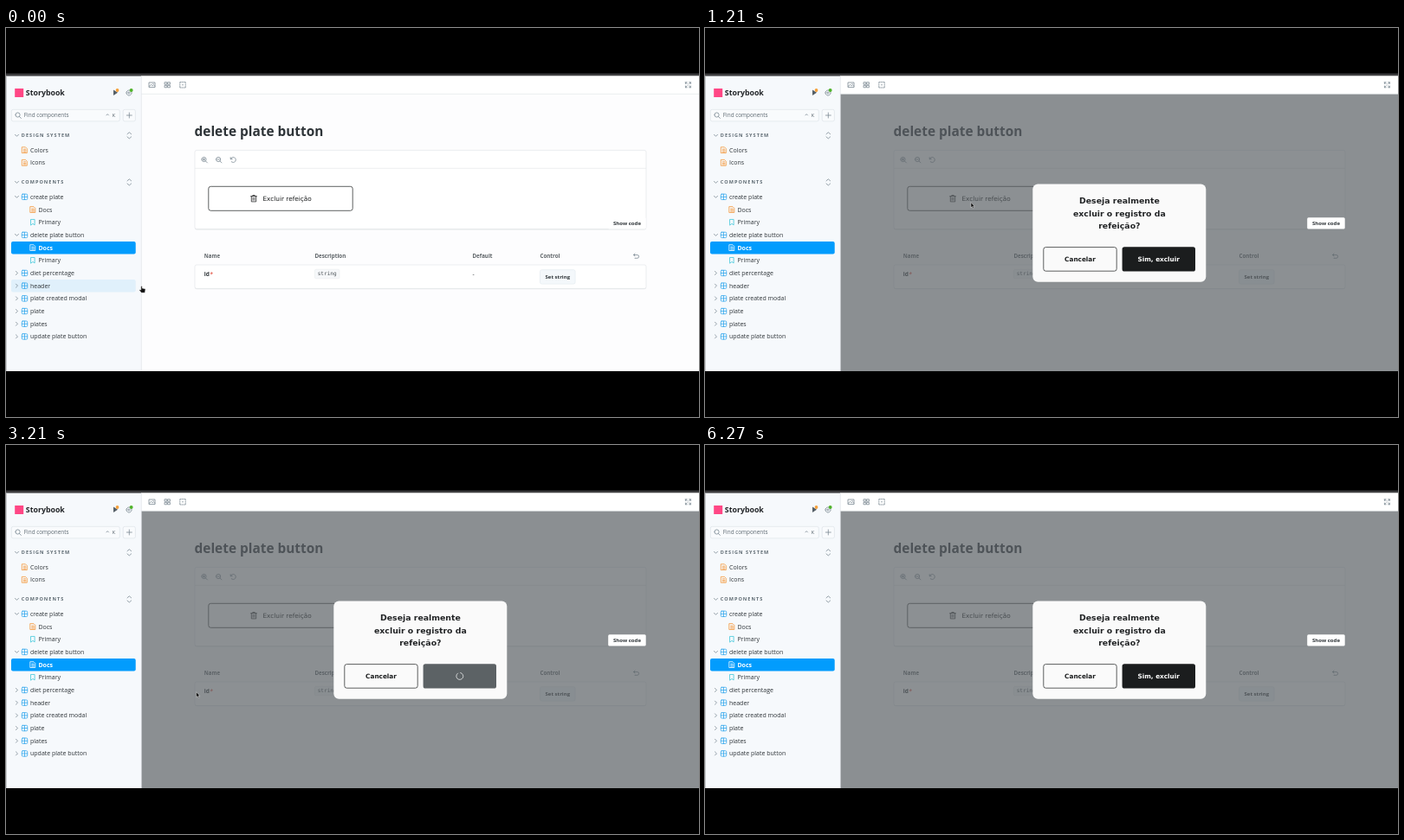
These frames come from a looping animation (800x450 px, 6.3 s). An HTML page:

```html
<!DOCTYPE html>
<html lang="en">
<head>
<meta charset="utf-8">
<title>Delete plate button</title>
<style>
  html, body { margin: 0; width: 100%; height: 100%; overflow: hidden; background: #000; }
  svg { display: block; width: 100%; height: 100%; }
  text { font-family: "Open Sans", "Noto Sans", sans-serif; fill: #2e3438; white-space: pre; }
  .b { font-weight: 700; }
  .body { font-family: "DejaVu Sans", sans-serif; }
  .mono { font-family: "DejaVu Sans Mono", monospace; }
  .mid { text-anchor: middle; }
  .icon { fill: none; stroke-width: .75; stroke-linecap: round; stroke-linejoin: round; }
</style>
</head>
<body>
<svg id="stage" viewBox="0 0 800 450"></svg>
<script>
const LOOP = 6300;
const MODAL_AT = 1200;
const LOADING = [2370, 4700];
const BLUE = '#029cfd', ORANGE = '#f5922f', TEAL = '#37c5d8', GRAY = '#73828c', INK = '#1b1d1e', SLATE = '#5c6265';
const ROW_TOP = 188, ROW_STEP = 14.69;

const rect = (x, y, w, h, fill, extra = '') =>
  `<rect x="${x}" y="${y}" width="${w}" height="${h}" fill="${fill}" ${extra}/>`;
const text = (x, y, size, label, cls = '', fill = '') =>
  `<text x="${x}" y="${y}" font-size="${size}" class="${cls}" ${fill && `style="fill:${fill}"`}>${label}</text>`;
const icon = (x, y, d, color = GRAY, extra = '') =>
  `<path class="icon" transform="translate(${x} ${y})" d="${d}" stroke="${color}" ${extra}/>`;
const line = (x1, y1, x2, y2, color) =>
  `<path d="M${x1} ${y1}L${x2} ${y2}" stroke="${color}" stroke-width=".6"/>`;
const circle = (r, x = 0, y = 0) => `M${x - r} ${y}a${r} ${r} 0 1 0 ${2 * r} 0a${r} ${r} 0 1 0 ${-2 * r} 0`;

const shapes = {
  component: 'M-2.2 -3.2H2.2Q3.2 -3.2 3.2 -2.2V2.2Q3.2 3.2 2.2 3.2H-2.2Q-3.2 3.2 -3.2 2.2V-2.2Q-3.2 -3.2 -2.2 -3.2ZM0 -3.2V3.2M-3.2 0H3.2',
  doc: 'M-2.8 -3.4H1L2.8 -1.6V3.4H-2.8ZM-1.3 -1H1.2M-1.3 .6H1.4M-1.3 2.1H1.4',
  story: 'M-2.1 -3.3H2.1V3.2L0 1.6L-2.1 3.2Z',
  open: 'M-2 -1L0 1L2 -1',
  closed: 'M-1 -2L1 0L-1 2',
  expand: 'M-2.3 -1.6L0 -3.6L2.3 -1.6M-2.3 1.6L0 3.6L2.3 1.6',
  search: circle(2.6, -.5, -.5) + 'M1.5 1.5L3.4 3.4',
  plus: 'M-3 0H3M0 -3V3',
  picture: 'M-3.3 -2.8H3.3V2.8H-3.3ZM-3.3 1.5L-1 -.4L.5 1L1.8 0L3.3 1.4M1 -1.3h.3',
  grid: 'M-3 -3H-.6V-.6H-3ZM.6 -3H3V-.6H.6ZM-3 .6H-.6V3H-3ZM.6 .6H3V3H.6Z',
  outline: 'M-3.2 -1.7V-3.2H-1.7M1.7 -3.2H3.2V-1.7M3.2 1.7V3.2H1.7M-1.7 3.2H-3.2V1.7M-.5 -3.2H.5M-.5 3.2H.5M-3.2 -.5V.5M3.2 -.5V.5M-.5 0H.5',
  full: 'M-3 -1.2V-3H-1.2M1.2 -3H3V-1.2M3 1.2V3H1.2M-1.2 3H-3V1.2M-3 -3L-.9 -.9M3 -3L.9 -.9M3 3L.9 .9M-3 3L-.9 .9',
  reset: 'M-3.2 -2.8V-.8H-1.2M-3 -1A3 3 0 1 1 -2.2 2.2',
  undo: 'M-1.5 -2.8L-3 -1.3L-1.5 .2M-3 -1.3H1.2A1.9 1.9 0 0 1 1.2 2.5H-1.5',
  trash: 'M-3.4 -2.6H3.4M-1.2 -2.6V-3.8H1.2V-2.6M-2.7 -2.6V3.6H2.7V-2.6M-.9 -.8V1.9M.9 -.8V1.9',
};

const rows = [
  ['create plate', 'open'], ['Docs', 'doc'], ['Primary', 'story'],
  ['delete plate button', 'open'], ['Docs', 'doc', true], ['Primary', 'story'],
  ...['diet percentage', 'header', 'plate created modal', 'plate', 'plates', 'update plate button'].map(n => [n, 'closed']),
];

function row([label, kind, selected], i) {
  const y = ROW_TOP + ROW_STEP * (i + .5);
  const leaf = kind === 'doc' || kind === 'story';
  const tint = selected ? '#fff' : kind === 'doc' ? ORANGE : TEAL;
  return (selected ? rect(6, y - 7.2, 143.7, 14.5, BLUE, 'rx="2"') : '') +
    (leaf ? icon(31, y, shapes[kind], tint)
          : icon(12.5, y, shapes[kind], GRAY) + icon(21.5, y, shapes.component, '#2ba5ec')) +
    text(leaf ? 37.4 : 28, y + 2.5, 7, label, selected ? 'b' : '', selected ? '#fff' : '');
}

const section = (y, label) => icon(12.5, y, shapes.open) +
  `<g letter-spacing="1.05">${text(17.8, y + 2, 5.5, label, 'b', '#5c6870')}</g>` + icon(142.3, y, shapes.expand);

function sidebar() {
  return rect(0, 55.5, 156, 341.5, '#f6f9fc') + rect(0, 55.5, .7, 341.5, '#b5b8ba') +
    rect(10.2, 70, 10, 10, '#ff4785') + text(22.8, 78.2, 8.8, 'Storybook', 'b', '#222528') +
    '<path d="M124 71.5L129 74.7L124 78Z" fill="#555f66"/><circle cx="128.5" cy="72" r="1.9" fill="#f5a13c"/>' +
    icon(142, 75, circle(3) + circle(1.1), GRAY, 'stroke-dasharray="1.6 .6"') +
    '<circle cx="144.6" cy="72" r="2" fill="#4fb32a"/>' +
    rect(6.3, 94.3, 125, 13.6, '#f9fbfd', 'rx="2" stroke="#d9dfe5" stroke-width=".6"') +
    icon(14, 101, shapes.search) + text(20.8, 103.4, 6.4, 'Find components', '', '#5c6870') +
    icon(117.2, 100.3, 'M-1.3 .6L0 -.7L1.3 .6') + text(122.4, 103.2, 6, 'K', '', '#5c6870') +
    rect(135.2, 94.3, 14.2, 13.6, '#f9fbfd', 'rx="2" stroke="#d9dfe5" stroke-width=".6"') + icon(142.3, 101, shapes.plus) +
    section(124.3, 'DESIGN SYSTEM') + section(178.4, 'COMPONENTS') +
    icon(21.5, 141.2, shapes.doc, ORANGE) + text(28, 143.7, 7, 'Colors') +
    icon(21.5, 155.8, shapes.doc, ORANGE) + text(28, 158.3, 7, 'Icons') +
    '<rect id="rowHover" x="6" width="143.7" height="14.5" rx="2" fill="#e0f0fb"/>' +
    rows.map(row).join('');
}

const card = (y, h) => rect(218, y + .8, 521, h, '#e6e8ea', 'rx="2"') +
  rect(218, y, 521, h, '#fff', 'rx="2" stroke="#dfe3e6" stroke-width=".6"');

function page() {
  const head = '#5d6367';
  return text(217.6, 125.2, 15.4, 'delete plate button', 'b') +
    card(141.4, 91.2) + line(218, 162.3, 739, 162.3, '#dfe3e6') +
    icon(229, 152.5, shapes.search + 'M-1.7 -.5H.7M-.5 -1.7V.7') +
    icon(245.6, 152.5, shapes.search + 'M-1.7 -.5H.7') + icon(262.4, 152.5, shapes.reset) +
    '<rect id="deleteButton" x="233.8" y="183.3" width="166.4" height="28" rx="2.6" stroke="#1b1d1e" stroke-width=".7"/>' +
    icon(286, 197.3, shapes.trash, INK) + text(296.5, 200, 7.3, 'Excluir refeição', 'body', INK) +
    text(228.8, 266.1, 6.1, 'Name', 'b', head) + text(356.4, 266.1, 6.25, 'Description', 'b', head) +
    text(538.5, 266.1, 6.2, 'Default', 'b', head) + text(616.5, 266.1, 6.2, 'Control', 'b', head) +
    icon(727.5, 263.8, shapes.undo) + card(274, 27.5) +
    text(228.8, 287, 6.5, 'id', 'b') + text(235.4, 286.6, 6.5, '*', '', '#e0402f') +
    rect(356.4, 279.2, 28.6, 10.6, '#f6f8fa', 'rx="1.6" stroke="#e4e8eb" stroke-width=".5"') +
    text(359.7, 286.4, 6.1, 'string', 'mono', '#4a5156') + text(538.6, 286.8, 6.8, '-') +
    rect(616.5, 279.7, 40.6, 16.4, '#f4f8fb', 'rx="2" stroke="#e0e7ec" stroke-width=".6"') +
    text(636.8, 290.2, 6, 'Set string', 'b mid');
}

function modal() {
  const title = ['Deseja realmente', 'excluir o registro da', 'refeição?'];
  return rect(378.3, 180.5, 200, 113.2, '#fafafa', 'rx="6"') +
    title.map((s, i) => text(478.4, 203.2 + 14.6 * i, 9.37, s, 'body b mid', '#222426')).join('') +
    rect(390.8, 253.6, 84.4, 27.6, '#fafafa', 'rx="2.6" stroke="#1b1d1e" stroke-width=".7"') +
    text(433, 270, 7.3, 'Cancelar', 'body b mid', INK) +
    '<rect id="confirm" x="481.6" y="253.3" width="84.4" height="28.2" rx="2.6"/>' +
    text(523.7, 270, 7.3, '<tspan id="confirmLabel">Sim, excluir</tspan>', 'body b mid', '#fff') +
    '<path id="spinner" class="icon" d="M-1.6 -3.7A4 4 0 1 0 1.6 -3.7" stroke="#e8e9e9"/>';
}

const $ = id => document.getElementById(id);
const show = (id, on) => $(id).setAttribute('visibility', on ? 'visible' : 'hidden');

$('stage').innerHTML =
  rect(0, 0, 800, 450, '#000') + rect(0, 52.6, 800, 3, '#3d3d3f') +
  rect(156, 55.5, 644, 341.5, '#fdfdfe') + sidebar() +
  rect(156, 55.5, 644, 20.8, '#fff') +
  icon(168.7, 65.8, shapes.picture) + icon(186.4, 65.8, shapes.grid) + icon(204, 65.8, shapes.outline) +
  icon(787.4, 65.8, shapes.full) + page() +
  `<g id="overlay">${rect(156.3, 76.4, 643.7, 320.6, SLATE, 'opacity=".7"')}</g>` +
  line(156.3, 55.5, 156.3, 397, '#d9dee3') + line(156.3, 76.3, 800, 76.3, '#dce1e5') +
  rect(695.2, 219.3, 43.5, 13.2, '#fff', 'rx="1.5"') + text(717, 228, 6.05, 'Show code', 'b mid') +
  `<g id="modal">${modal()}</g>` +
  `<g id="cursor" stroke="#fff" stroke-width=".4" stroke-linejoin="round" fill="#111">
    <path id="arrow" d="M0 0V6L1.4 4.8L2.5 7L3.5 6.5L2.5 4.4H4.2Z"/>
    <path id="hand" d="M-.7 .5Q0 -.5 .7 .5V2.6L4 3.2Q4.5 3.4 4.4 4.2L3.8 7.8H-.2L-2.6 4.8Q-2.3 3.8 -1.2 4.3L-.7 4.7Z"/>
  </g>`;

// Cursor stops: time, x, y.
const path = [
  [100, 156.5, 298.5], [900, 307, 201.8], [1400, 307, 201.8], [1970, 529.5, 267.3],
  [2450, 529.5, 267.3], [3300, 209.8, 286.3], [4220, 209.8, 286.3], [4560, -10, 345],
];

function cursorAt(t) {
  const next = path.findIndex(stop => stop[0] > t);
  if (next <= 0) return path[next ? path.length - 1 : 0].slice(1);
  const [t0, x0, y0] = path[next - 1], [t1, x1, y1] = path[next];
  const u = (t - t0) / (t1 - t0), e = u * u * (3 - 2 * u);
  return [x0 + (x1 - x0) * e, y0 + (y1 - y0) * e];
}

function draw(t) {
  const [x, y] = cursorAt(t);
  const within = (l, top, r, b) => x > l && x < r && y > top && y < b;
  const open = t >= MODAL_AT;
  const loading = t >= LOADING[0] && t < LOADING[1];
  const onConfirm = open && within(481, 253, 566, 282);
  const rowIndex = Math.floor((y - ROW_TOP) / ROW_STEP);
  const onRow = x > 0 && x < 157.5 && rowIndex >= 0 && rowIndex < rows.length;

  show('overlay', open);
  show('modal', open);
  show('rowHover', onRow);
  $('rowHover').setAttribute('y', ROW_TOP + ROW_STEP * rowIndex + .1);
  $('deleteButton').setAttribute('fill', !open && within(233, 183, 400, 212) ? '#eeecef' : '#fff');
  $('confirm').setAttribute('fill', onConfirm || loading ? SLATE : INK);
  $('confirmLabel').setAttribute('fill-opacity', loading ? 0 : 1);
  show('spinner', loading);
  $('spinner').setAttribute('transform', `translate(523.8 267.4) rotate(${(t - 4240) * .36})`);
  show('arrow', !onRow && !onConfirm);
  show('hand', onRow || onConfirm);
  $('cursor').setAttribute('transform', `translate(${x} ${y})`);
}

const start = performance.now();
function tick() {
  draw((performance.now() - start) % LOOP);
  requestAnimationFrame(tick);
}
tick();
</script>
</body>
</html>
```
